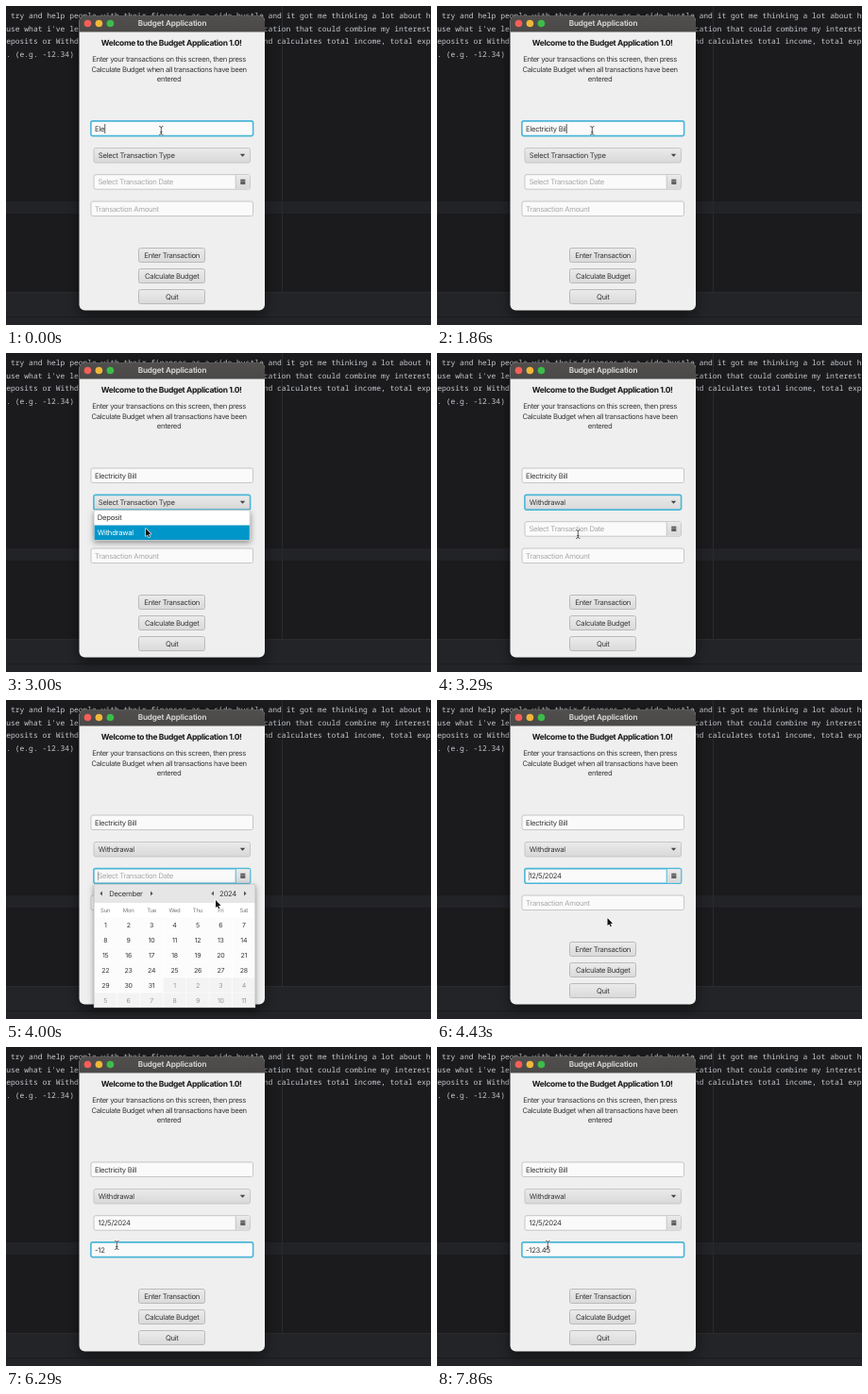
These frames come from a looping animation (450x338 px, 8000 ms). An HTML page with a canvas:

```html
<!DOCTYPE html>
<html lang="en">
<head>
<meta charset="utf-8">
<title>Budget Application</title>
<style>
html, body { margin: 0; width: 100%; height: 100%; overflow: hidden; background: #1b1b1d; }
canvas { display: block; width: 450px; height: 338px; }
</style>
</head>
<body>
<canvas id="stage" width="450" height="338"></canvas>
<script>
const ctx = document.getElementById('stage').getContext('2d');
const LOOP = 8000, STEP = 1000 / 7;
const SANS = 'Inter, "Liberation Sans", sans-serif';
const MONO = '"Noto Sans Mono", "DejaVu Sans Mono", monospace';
const INK = '#383838', PROMPT = '#a8a8a8', RING = '#4bb6d8', ACCENT = '#0096c9', PAPER = '#fafafa';

// Each row: first step, then the values held from there on.
const nameKeys = [[0, 'Ele'], [1, 'Electric'], [3, 'Electricit'], [4, 'Electricity'], [6, 'Electricity '],
  [9, 'Electricity B'], [11, 'Electricity Bill'], [13, 'Electricity Bil'], [14, 'Electricity Bill']];
const amountKeys = [[0, ''], [41, '-1'], [42, '-12'], [48, '-123'], [50, '-123.'], [52, '-123.4'], [53, '-123.45']];
const focusKeys = [[0, 'name'], [17, 'type'], [27, 'date'], [36, 'amount']];
const caretKeys = [[0, 1], [5, 0], [6, 1], [8, 0], [9, 1], [15, 0], [16, 1], [33, 0], [35, 1],
  [39, 0], [41, 1], [44, 0], [46, 1], [55, 0]];
const mouseKeys = [[0, 'beam', 164, 132], [16, 'arrow', 163, 146], [17, 'arrow', 161, 159],
  [20, 'arrow', 153, 173], [21, 'arrow', 148, 186], [23, 'beam', 149, 192], [24, 'beam', 172, 190],
  [25, 'beam', 215, 187], [26, 'arrow', 249, 184], [28, 'arrow', 222, 212], [29, 'arrow', 197, 234],
  [31, 'arrow', 180.5, 231], [32, 'arrow', 172, 229], [33, 'arrow', 150, 223],
  [34, 'beam', 130, 214], [35, 'beam', 118, 211], [36, 'beam', 117, 210]];

const at = (keys, k) => keys.filter(row => row[0] <= k).pop().slice(1);

function text(str, x, y, { size = 7.7, weight = 400, color = INK, align = 'left', track = -0.038 } = {}) {
  ctx.font = `${weight} ${size}px ${SANS}`;
  ctx.letterSpacing = size * track + 'px';
  ctx.textAlign = 'left';
  const w = ctx.measureText(str).width;
  ctx.fillStyle = color;
  ctx.fillText(str, align === 'center' ? x - w / 2 : x, y);
  return w;
}

function box(x, y, w, h, r, fill, stroke, line = 1) {
  ctx.beginPath();
  ctx.roundRect(x, y, w, h, r);
  if (fill) { ctx.fillStyle = fill; ctx.fill(); }
  if (stroke) { ctx.strokeStyle = stroke; ctx.lineWidth = line; ctx.stroke(); }
}

function rect(x, y, w, h, color) {
  ctx.fillStyle = color;
  ctx.fillRect(x, y, w, h);
}

function dot(x, y, r, color) {
  ctx.beginPath();
  ctx.arc(x, y, r, 0, Math.PI * 2);
  ctx.fillStyle = color;
  ctx.fill();
}

function poly(points, fill, stroke) {
  ctx.beginPath();
  points.forEach(([x, y]) => ctx.lineTo(x, y));
  ctx.closePath();
  if (stroke) { ctx.strokeStyle = stroke; ctx.lineWidth = 1.2; ctx.lineJoin = 'round'; ctx.stroke(); }
  ctx.fillStyle = fill;
  ctx.fill();
}

function fade(y, h, top, bottom) {
  const g = ctx.createLinearGradient(0, y, 0, y + h);
  g.addColorStop(0, top);
  g.addColorStop(1, bottom);
  return g;
}

function shadowed(blur, dy, alpha, draw) {
  ctx.save();
  ctx.shadowColor = `rgba(0,0,0,${alpha})`;
  ctx.shadowBlur = blur;
  ctx.shadowOffsetY = dy;
  draw();
  ctx.restore();
}

function code(str, col, row) {
  ctx.font = `500 7.97px ${MONO}`;
  ctx.letterSpacing = '0px';
  ctx.textAlign = 'left';
  ctx.fillStyle = '#c6c9ce';
  ctx.fillText(str, 0.2 + col * 4.78, 13 + row * 13.5);
}

function editor() {
  rect(0, 0, 450, 338, '#1b1b1d');
  rect(0, 207, 450, 13, '#222327');
  rect(292, 0, 1, 304, '#292a2d');
  rect(0, 304, 450, 34, '#222427');
  rect(0, 303, 450, 1, '#292b2d');
  rect(0, 329, 450, 1, '#1a1b1d');
  code('try and help people with their finances as a side hustle and it got me thinking a lot about h', 1, 0);
  code("use what i've le", 0, 1);
  code('cation that could combine my interest', 57, 1);
  code('eposits or Withd', 0, 2);
  code('nd calculates total income, total exp', 57, 2);
  code('. (e.g. -12.34)', 0, 3);
}

function button(label, y) {
  box(140.5, y + 0.5, 70, 15, 2, fade(y, 16, '#ececec', '#d9d9d9'), '#bababa');
  text(label, 175.7, y + 10.9, { align: 'center' });
}

function frame(x, y, w, focused, fill) {
  if (focused) box(x + 0.4, y + 0.4, w - 0.8, 15.7, 2, fill, RING, 1.6);
  else box(x + 0.5, y + 0.5, w - 1, 15.5, 2, fill, '#c6c6c6');
}

function field(x, y, w, value, prompt, focused, caret) {
  frame(x, y, w, focused, PAPER);
  let end = 0;
  if (value) end = text(value, x + 4.6, y + 11.1);
  else if (!focused) text(prompt, x + 4.6, y + 11.1, { color: PROMPT });
  if (focused && caret) rect(x + 4.8 + end, y + 3.5, 0.8, 10, '#333');
}

function combo(label, focused) {
  frame(92.5, 150, 166.5, focused, fade(150, 16, '#ebebeb', '#d8d8d8'));
  text(label, 97.8, 161);
  poly([[247.8, 156.8], [253.2, 156.8], [250.5, 159.7]], '#444');
}

function datePicker(value, focused, caret) {
  const y = 178.2;
  frame(92.5, y, 166.5, focused, PAPER);
  rect(243.5, y + 1, 14.7, 14.5, fade(y, 16, '#ebebeb', '#d8d8d8'));
  rect(242.7, y + 1, 1, 14.5, focused ? RING : '#c2c2c2');
  rect(248.3, 183.7, 5, 5.3, '#555');
  rect(248.3, 185, 5, 0.6, '#bbb');
  rect(248.8, 187, 4, 0.4, '#999');
  text(value || 'Select Transaction Date', 97.4, y + 10.9, { color: value ? INK : PROMPT });
  if (focused && caret) rect(97, y + 3.5, 0.6, 9.5, '#666');
}

function typeList(hover) {
  shadowed(6, 2, 0.4, () => box(93, 166.5, 165.5, 32, 0, '#fff'));
  box(93.2, 166.7, 165, 31.6, 0, null, '#c4c4c4', 0.7);
  ['Deposit', 'Withdrawal'].forEach((label, i) => {
    if (hover === i) rect(93.6, 167 + i * 15.5, 164.2, 15.5, ACCENT);
    text(label, 96.8, 177.3 + i * 15.4, { color: hover === i ? '#fff' : INK });
  });
}

function calendar(hover) {
  const x = 93, y = 195, w = 171, cw = w / 7, ch = 16;
  shadowed(6, 2, 0.4, () => box(x, y, w, 131, 0, '#fff'));
  rect(x, y, w, 20, '#e6e6e6');
  text('December', x + 34, y + 13, { align: 'center' });
  text('2024', x + 142, y + 13, { align: 'center' });
  for (const [ax, d] of [[x + 8, -1], [x + 61, 1], [x + 126, -1], [x + 160, 1]])
    poly([[ax - d, y + 7.5], [ax + 1.6 * d, y + 10], [ax - d, y + 12.5]], '#555');
  'Sun Mon Tue Wed Thu Fri Sat'.split(' ').forEach((day, i) =>
    text(day, x + (i + 0.5) * cw, y + 30, { size: 6, color: '#777', align: 'center' }));
  for (let i = 0; i < 42; i++) {
    const cx = x + (i % 7) * cw, cy = y + 35 + Math.floor(i / 7) * ch;
    const next = i > 30, lit = hover && i === 4;
    rect(cx + 0.3, cy + 0.3, cw - 0.6, ch - 0.6, lit ? ACCENT : next ? '#f3f3f3' : '#fcfcfc');
    text(String(next ? i - 30 : i + 1), cx + cw / 2, cy + 10.8,
      { size: 7, align: 'center', color: lit ? '#fff' : next ? '#999' : INK });
  }
  box(x + 0.3, y + 0.3, w - 0.6, 130.4, 0, null, '#c4c4c4', 0.7);
}

function mouse(kind, x, y) {
  if (kind === 'arrow') {
    const tip = [[0, 0], [0, 8], [1.8, 6.4], [3.2, 9.3], [4.3, 8.7], [3, 5.9], [5.5, 5.7]];
    poly(tip.map(([a, b]) => [x + a, y + b]), '#111', '#fff');
    return;
  }
  for (const [color, line] of [['rgba(255,255,255,.7)', 1.8], ['#333', 0.8]]) {
    ctx.strokeStyle = color;
    ctx.lineWidth = line;
    ctx.beginPath();
    for (const s of [-1, 1]) {
      ctx.moveTo(x - 1.9, y + 4.4 * s);
      ctx.quadraticCurveTo(x + 0.3, y + 4.4 * s, x + 0.3, y + 3.2 * s);
      ctx.quadraticCurveTo(x + 0.3, y + 4.4 * s, x + 2.5, y + 4.4 * s);
    }
    ctx.moveTo(x + 0.3, y - 3.6);
    ctx.lineTo(x + 0.3, y + 3.6);
    ctx.moveTo(x - 0.9, y + 1.6);
    ctx.lineTo(x + 1.5, y + 1.6);
    ctx.stroke();
  }
}

function windowFrame() {
  shadowed(14, 5, 0.5, () => box(77.5, 10, 196.5, 312.5, 6, '#efefef'));
  box(77.5, 10, 196.5, 17.5, [6, 6, 0, 0], fade(10, 17, '#514f4d', '#4a4947'));
  rect(80, 10, 191, 0.6, '#62615f');
  dot(86.5, 18.5, 3.8, '#f45f58');
  dot(98.4, 18.5, 3.8, '#f0b738');
  dot(110.4, 18.5, 3.8, '#3bbd4a');
  text('Budget Application', 176, 21.2, { size: 8.2, weight: 600, color: '#dedede', align: 'center', track: -0.02 });
  text('Welcome to the Budget Application 1.0!', 175.2, 42.1,
    { size: 8.45, weight: 700, color: '#161616', align: 'center', track: -0.04 });
  ['Enter your transactions on this screen, then press',
    'Calculate Budget when all transactions have been', 'entered']
    .forEach((line, i) => text(line, 172.6, 59.2 + i * 10.3, { align: 'center', track: -0.045 }));
}

function draw(now) {
  const k = Math.floor(((now % LOOP) + 5) / STEP) % 56;
  const [focus] = at(focusKeys, k), [caret] = at(caretKeys, k);
  editor();
  windowFrame();
  field(89.5, 121.5, 172.5, at(nameKeys, k)[0], '', focus === 'name', caret);
  combo(k < 22 ? 'Select Transaction Type' : 'Withdrawal', focus === 'type');
  datePicker(k < 30 ? '' : '12/5/2024', focus === 'date', caret);
  field(89.5, 206.5, 172.5, at(amountKeys, k)[0], 'Transaction Amount', focus === 'amount', caret);
  button('Enter Transaction', 256);
  button('Calculate Budget', 278);
  button('Quit', 300);
  if (k >= 18 && k < 22) typeList(k - 20);
  if (k >= 27 && k < 30) calendar(k === 29);
  mouse(...at(mouseKeys, k));
}

ctx.textRendering = 'geometricPrecision';
const start = performance.now();
function tick() {
  draw(performance.now() - start);
  requestAnimationFrame(tick);
}
tick();
</script>
</body>
</html>
```
